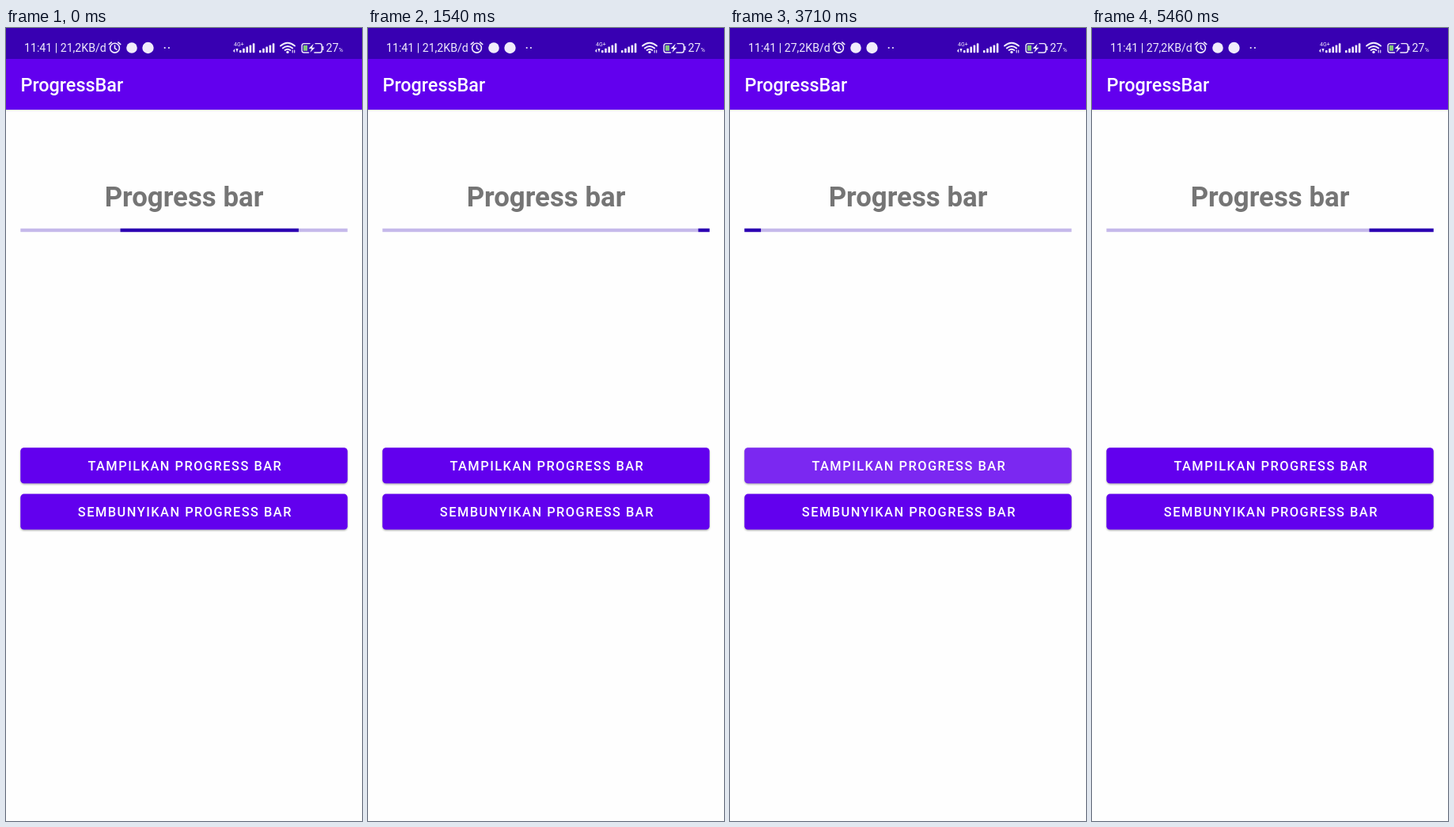
These frames come from a looping animation (450 px wide and 1000 px high, 5530 ms). An HTML page:

```html
<!DOCTYPE html>
<html lang="id">
<head>
<meta charset="utf-8">
<title>ProgressBar</title>
<style>
  html, body { margin: 0; width: 100%; height: 100%; overflow: hidden; background: #fefefe; }
  svg { display: block; width: 450px; height: 1000px; font-family: Roboto, sans-serif; }
  .status { fill: #f1ecfb; }
  .line { fill: none; stroke: #f1ecfb; stroke-linecap: round; }
  .label { font-size: 16.4px; font-weight: 500; letter-spacing: 1.48px; text-anchor: middle; fill: #fff; }
  .ripple { fill: #fff; clip-path: url(#buttonClip); }
</style>
</head>
<body>
<svg viewBox="0 0 450 1000">
  <defs>
    <rect id="face" x="18.3" y="529.2" width="413.4" height="45" rx="4.4"/>
    <clipPath id="buttonClip"><use href="#face"/></clipPath>
    <filter id="soft" x="-5%" y="-30%" width="110%" height="160%"><feGaussianBlur stdDeviation="1.1"/></filter>
    <g id="button">
      <use href="#face" y="1.2" opacity=".32" filter="url(#soft)"/>
      <use href="#face" fill="#6200ee"/>
    </g>
  </defs>
  <rect width="450" height="1000" fill="#fefefe"/>

  <rect x="-5" y="90" width="460" height="13.5" opacity=".2" filter="url(#soft)"/>
  <rect y="38" width="450" height="65" fill="#6200ee"/>
  <rect width="450" height="39" fill="#3800b2"/>
  <text x="18.5" y="80" font-size="23.4" font-weight="500" fill="#fff">ProgressBar</text>

  <g class="status">
    <text id="clock" x="23" y="30" font-size="14.15"></text>
    <circle cx="159" cy="25" r="6.8"/>
    <circle cx="179.5" cy="25" r="7.2"/>
    <circle cx="200.7" cy="25" r="1.1"/>
    <circle cx="205.9" cy="25" r="1.1"/>
    <text x="288" y="22.6" font-size="7">4G+</text>
    <path d="M287 29l2.2-3v5zM290.5 26h3l-1.5 5z"/>
    <g id="signals"></g>
    <circle cx="356" cy="30.4" r="1.7"/>
    <path d="M400.2 23h1.3v5h-1.3z"/>
    <rect x="375.8" y="21.8" width="5.2" height="7" fill="#83c77c"/>
    <path d="M388.8 19.8l-6.2 6.3h3.7l-2 5 6.2-6.4h-3.6z"/>
    <text x="404.6" y="30" font-size="14.15">27</text>
    <text x="420.6" y="30" font-size="7.5">%</text>
  </g>
  <g class="line" stroke-width="1.6">
    <circle cx="137.5" cy="25.2" r="5.9"/>
    <path d="M137.5 22v3.6l2.4 1.5M130.2 20.6l3-2.5M144.8 20.6l-3-2.5"/>
    <path d="M347 22.6q9-7.6 18 0M349.8 25.4q6.2-5 12.4 0M352.6 28q3.4-2.6 6.8 0" stroke-width="1.9"/>
    <path d="M362.2 31v-3M364.7 28v3" stroke-width="1.1"/>
    <path d="M384 19.6h-7.2q-2.8 0-2.8 2.8v5.8q0 2.8 2.8 2.8h5.7M391 19.6h5.5q2.8 0 2.8 2.8v5.8q0 2.8-2.8 2.8h-6.6" stroke-width="1.4"/>
  </g>

  <text x="225" y="225" font-size="34.8" font-weight="700" fill="#757575" text-anchor="middle">Progress bar</text>

  <g id="bar" fill="#2c00b2">
    <rect x="18.3" y="252.8" width="413.4" height="4.4" fill="#c5b9ea"/>
    <rect id="lead" y="252.8" height="4.4"/>
    <rect id="tail" y="252.8" height="4.4"/>
  </g>

  <use href="#button"/>
  <g class="ripple"><circle id="show" cx="225" cy="551.5"/></g>
  <text class="label" x="226.4" y="557.6">TAMPILKAN PROGRESS BAR</text>

  <g transform="translate(0 58.4)">
    <use href="#button"/>
    <g class="ripple"><circle id="hide" cx="225" cy="551.5"/></g>
    <text class="label" x="226.4" y="558.1">SEMBUNYIKAN PROGRESS BAR</text>
  </g>
</svg>
<script>
const LOOP = 5530, STEP = 70;
const HIDE_TAP = 2030, SHOW_TAP = 3503, CLICK = 105, RATE_CHANGE = 2800;
const LEFT = 18.3, WIDTH = 413.4;

const $ = id => document.getElementById(id);
const set = (el, attrs) => {
  for (const k in attrs) el.setAttribute(k, attrs[k]);
};
const clamp = v => Math.min(1, Math.max(0, v));
const easeOut = v => 1 - Math.pow(1 - clamp(v), 1.6);

// Segment ends as fractions of the track, for cycle position p.
const lead = p => {
  const u = p - 0.11;
  return [0.95 * u + 2.3 * u ** 3, 2.55 * p - 0.125 * (1 - Math.exp(-p / 0.055))];
};
const tail = p => [easeOut((p - 0.7) / 0.28), easeOut((p - 0.5715) / 0.3)];

function drawSegment(id, ends) {
  const [a, b] = ends.map(clamp);
  set($(id), { x: LEFT + WIDTH * a, width: WIDTH * (b - a) });
}

function drawBar(t) {
  const first = t < HIDE_TAP + CLICK;
  const s = (first ? t : t - SHOW_TAP - CLICK) / 1000;
  $('bar').style.display = first || s >= 0 ? '' : 'none';
  // The first run starts mid-cycle and picks up speed; the second is steady.
  const p = Math.max(0, first ? 0.3825 + 0.3282 * s + 0.02446 * s * s : 0.4745 * s) % 1;
  drawSegment('lead', lead(p));
  drawSegment('tail', tail(p));
}

function drawRipple(id, t) {
  const fade = clamp(t / 75) * clamp((490 - t) / 210);
  set($(id), { r: 40 + 200 * clamp(t / 200), opacity: 0.155 * fade });
}

function draw(t) {
  $('clock').textContent = `11:41 | ${t < RATE_CHANGE ? '21,2' : '27,2'}KB/d`;
  drawBar(t);
  drawRipple('hide', t - HIDE_TAP);
  drawRipple('show', t - SHOW_TAP);
}

for (const left of [295, 320]) {
  for (let i = 0; i < 5; i++) {
    const bar = document.createElementNS('http://www.w3.org/2000/svg', 'rect');
    const height = 3.2 + 2.2 * i;
    set(bar, { x: left + i * 4.2, y: 31.2 - height, width: 2.6, height, rx: 0.8 });
    $('signals').append(bar);
  }
}

const start = performance.now();
function tick() {
  const t = (performance.now() - start + 1) % LOOP;
  draw(Math.floor(t / STEP) * STEP);
  requestAnimationFrame(tick);
}
tick();
</script>
</body>
</html>
```
